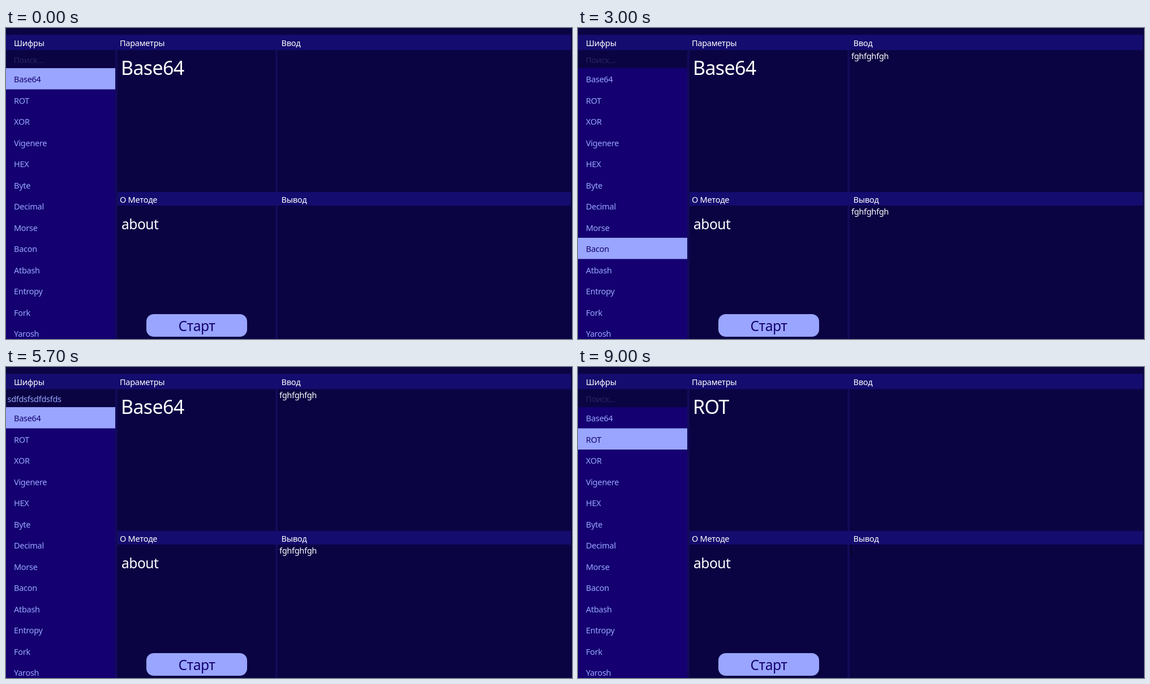
Write an HTML page that moves like this. It is 1000x550 px and loops after 9600 ms.

```html
<!DOCTYPE html>
<html lang="ru">
<head>
<meta charset="utf-8">
<title>Шифры</title>
<style>
  html, body { margin: 0; width: 100%; height: 100%; overflow: hidden; background: #0b0443; }
  svg { display: block; width: 1000px; height: 550px; }
  text { font: 14.5px "Noto Sans", "Open Sans", sans-serif; letter-spacing: -.02em; fill: #fff; }
  .bar { fill: #140c6e; }
  .split { fill: #120b58; }
  .list { fill: #140070; }
  .accent, .item, #query { fill: #99a5ff; }
  .item.on, .start { fill: #140070; }
  #hint { fill: #2b2364; }
  #title { font-size: 34px; }
  .about { font-size: 24.6px; }
  .start { font-size: 24.6px; text-anchor: middle; }
</style>
</head>
<body>
<svg viewBox="0 0 1000 550">
  <rect width="1000" height="550" fill="#0b0443"/>
  <rect class="split" x="193" y="39" width="4" height="511"/>
  <rect class="split" x="476" y="39" width="4" height="511"/>
  <rect class="bar" y="12" width="998" height="27"/>
  <rect class="bar" x="197" y="290" width="801" height="24"/>
  <rect class="list" y="71" width="193" height="479"/>
  <rect class="accent" id="mark" width="193" height="37.5"/>
  <g id="items"></g>

  <text x="14" y="32">Шифры</text>
  <text x="201" y="32">Параметры</text>
  <text x="486.5" y="32">Ввод</text>
  <text x="201" y="309">О Методе</text>
  <text x="486.5" y="309">Вывод</text>

  <text id="hint" x="13.5" y="62">Поиск...</text>
  <text id="query" x="2.5" y="62"></text>
  <text id="title" x="203" y="83"></text>
  <text class="about" x="204" y="356">about</text>
  <rect class="accent" x="248" y="506" width="178" height="40" rx="13"/>
  <text class="start" x="337" y="536">Старт</text>
  <text id="input" x="483" y="55"></text>
  <text id="output" x="483" y="330"></text>
  <rect id="caret" x="482" y="315" width="1" height="19" fill="#000"/>
</svg>
<script>
  const LOOP = 9600, ROW_TOP = 71, ROW = 37.5;
  const ciphers = ["Base64", "ROT", "XOR", "Vigenere", "HEX", "Byte", "Decimal",
    "Morse", "Bacon", "Atbash", "Entropy", "Fork", "Yarosh"];
  const message = "fghfghfgh", search = "sdfdsfsdfdsfds";

  // Each step keeps the values of the one before it unless it sets them.
  const steps = [
    { at: 0, row: 0, title: 0, input: 0, output: 0, query: 0, caret: false },
    { at: 900, input: 3 },
    { at: 1500, input: 8 },
    { at: 1800, input: 9 },
    { at: 2100, output: 9 },
    { at: 2700, row: 4 },
    { at: 3000, row: 8 },
    { at: 3300, row: 5 },
    { at: 3600, row: 0 },
    { at: 3900, query: 6 },
    { at: 4200, query: 14 },
    { at: 4800, row: 1, title: 1 },
    { at: 5100, row: 0, title: 0 },
    { at: 5400, row: 1, title: 1 },
    { at: 5700, row: 0, title: 0 },
    { at: 6900, row: 1, title: 1 },
    { at: 7500, query: 6 },
    { at: 7800, query: 2 },
    { at: 8100, query: 0 },
    { at: 8400, input: 4 },
    { at: 8700, input: 0 },
    { at: 9000, output: 0, caret: true }
  ];
  const states = [];
  for (const step of steps) states.push({ ...states.at(-1), ...step });

  const el = id => document.getElementById(id);
  const show = (id, visible) => el(id).setAttribute("visibility", visible ? "visible" : "hidden");

  const items = ciphers.map((name, i) => {
    const item = document.createElementNS(el("items").namespaceURI, "text");
    item.setAttribute("class", "item");
    item.setAttribute("x", 14);
    item.setAttribute("y", Math.round(96 + i * ROW));
    item.textContent = name;
    el("items").append(item);
    return item;
  });

  function render(state) {
    el("mark").setAttribute("y", ROW_TOP + state.row * ROW);
    items.forEach((item, i) => item.classList.toggle("on", i === state.row));
    el("title").textContent = ciphers[state.title];
    el("input").textContent = message.slice(0, state.input);
    el("output").textContent = message.slice(0, state.output);
    el("query").textContent = search.slice(0, state.query);
    show("hint", state.query === 0);
    show("caret", state.caret);
  }

  let current;
  function tick() {
    const time = performance.now() % LOOP;
    const state = states.findLast(s => s.at <= time);
    if (state !== current) render(current = state);
    requestAnimationFrame(tick);
  }
  tick();
</script>
</body>
</html>
```
